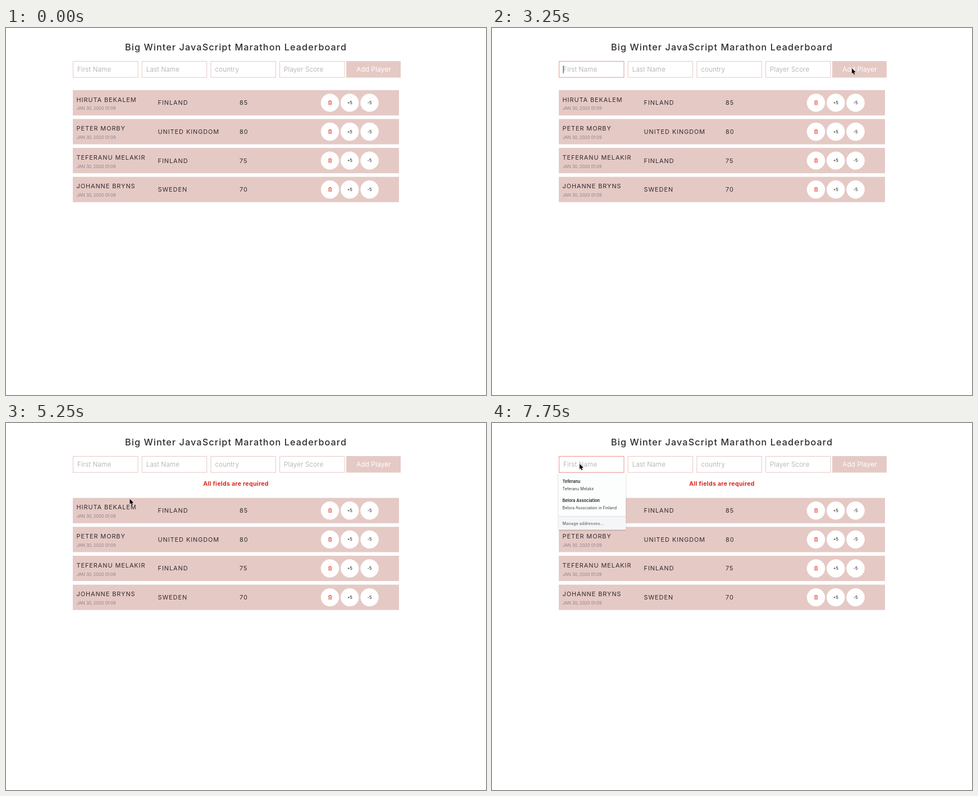
Recreate the animation shown at these times as an HTML page. Size 855 by 655 pixels, loop 8 s.

```html
<!DOCTYPE html>
<html lang="en">
<head>
<meta charset="utf-8">
<title>Leaderboard</title>
<style>
  html, body { margin: 0; width: 100%; height: 100%; overflow: hidden; background: #fff; }
  svg { display: block; width: 855px; height: 655px; font-family: Inter, sans-serif; fill: #302c2e; }
  .title { font-size: 16.2px; font-weight: 500; letter-spacing: 1.1px; text-anchor: middle; }
  .field { fill: #fff; stroke: #e5c9c5; }
  .field.focus { stroke: #ec9488; }
  .hint { font-size: 11.7px; font-weight: 300; letter-spacing: .15px; fill: #a6a6a6; }
  .add { font-size: 11.7px; letter-spacing: .15px; fill: #fff; text-anchor: middle; }
  .error { font-size: 10.6px; font-weight: 700; letter-spacing: .28px; fill: #dc2a1e; text-anchor: middle; }
  .band { fill: #e5c9c5; }
  .cell { font-size: 10.9px; letter-spacing: .95px; }
  .date { font-size: 7.6px; font-weight: 300; letter-spacing: -.05px; fill: #756b76; }
  .disc { fill: #fff; }
  .step { font-size: 7.2px; font-weight: 500; text-anchor: middle; }
  .bin { fill: none; stroke: #e5503f; stroke-width: .9; }
  .menu { font-size: 7.1px; fill: #3c3c3c; }
  .menu .name { font-size: 7.4px; font-weight: 600; fill: #222; }
</style>
</head>
<body>
<svg viewBox="0 0 855 655">
  <defs><filter id="shadow" x="-10%" y="-10%" width="120%" height="120%">
    <feDropShadow dx="0" dy="1" stdDeviation="1" flood-opacity=".35"/>
  </filter></defs>
  <text class="title" x="409.5" y="39.5">Big Winter JavaScript Marathon Leaderboard</text>
  <g id="form"></g>
  <rect class="band" x="606" y="59" width="97" height="29.5"/>
  <text class="add" x="655" y="78.2">Add Player</text>
  <rect id="caret" x="126.5" y="67" width="1" height="14" fill="#333"/>
  <text id="error" class="error" x="409.5" y="112">All fields are required</text>
  <g id="rows"></g>
  <g id="menu" class="menu">
    <rect x="118.5" y="89.5" width="119.7" height="100.7" fill="#fcfefd" filter="url(#shadow)"/>
    <path d="M118.5 167h119.7v23.2H118.5z" fill="#f5f6f7"/>
    <path d="M118.5 166.7h119.7" stroke="#d5d7d8" stroke-width=".8"/>
    <text class="name" x="125.5" y="107.3">Teferanu</text>
    <text x="125.5" y="119.6">Teferanu Melakir</text>
    <text class="name" x="125.5" y="141.4">Belora Association</text>
    <text x="125.5" y="153.7">Belora Association in Finland</text>
    <text x="125.5" y="181.7" font-weight="500" letter-spacing=".15" fill="#666">Manage addresses...</text>
  </g>
  <path id="cursor" d="M0 0v9.6l2.2-2 1.5 3.6 1.7-.7-1.5-3.5h3z" fill="#000" stroke="#fff" paint-order="stroke"/>
</svg>
<script>
const $ = id => document.getElementById(id);
const LOOP = 8000, TICK = 250;

const hints = ['First Name', 'Last Name', 'country', 'Player Score'];
$('form').innerHTML = hints.map((hint, i) => {
  const x = 119.5 + i * 122.7;
  return `<rect class="field" x="${x}" y="59.5" width="115.5" height="28.7"/>
    <text class="hint" x="${x + 7.5}" y="78.2">${hint}</text>`;
}).join('');

const players = [
  ['HIRUTA BEKALEM', 'FINLAND', 85],
  ['PETER MORBY', 'UNITED KINGDOM', 80],
  ['TEFERANU MELAKIR', 'FINLAND', 75],
  ['JOHANNE BRYNS', 'SWEDEN', 70]
];
$('rows').innerHTML = players.map(([name, country, score], i) => `
  <g transform="translate(119 ${110.8 + i * 51.6})">
    <rect class="band" width="581" height="45.2"/>
    <text class="cell" x="6.5" y="20.8">${name}</text>
    <text class="date" x="6.7" y="35.7">JAN 30, 2020 01:09</text>
    <text class="cell" x="151.5" y="26.5">${country}</text>
    <text class="cell" x="297" y="26.5">${score}</text>
    ${[458, 493.3, 528.6].map(x => `<circle class="disc" cx="${x}" cy="22.6" r="16.2"/>`).join('')}
    <path class="bin" d="M455 20.2h6.4M456.9 20v-1.1h2.6V20M455.7 20.4l.2 5.7h4.6l.2-5.7M457.4 21.8v2.9M459 21.8v2.9"/>
    <text class="step" x="493.3" y="25.2">+5</text>
    <text class="step" x="528.6" y="25.2">-5</text>
  </g>`).join('');

// Pointer stops: time, x, y
const stops = [
  [250, 190, 0], [750, 118.5, 186], [1250, 157.5, 38.5], [2000, 199.5, 152], [2500, 291, 110],
  [3250, 641, 72], [4000, 641, 72], [5250, 220.5, 135.5], [6250, 156, 73], [LOOP, 156, 73]
];

function pointerAt(t) {
  const i = stops.findIndex(stop => stop[0] > t);
  const [t0, x0, y0] = stops[i - 1], [t1, x1, y1] = stops[i];
  const k = (t - t0) / (t1 - t0);
  return [x0 + (x1 - x0) * k, y0 + (y1 - y0) * k];
}

const show = (id, on) => $(id).setAttribute('visibility', on ? 'visible' : 'hidden');

function draw(now) {
  const t = Math.floor(now % LOOP / TICK) * TICK;
  const failed = t >= 3500, menuOpen = t >= 6250;
  const clicked = t === 3250;
  const blinkOn = menuOpen && (t - 6250) % 1000 < 500;

  show('error', failed);
  $('rows').setAttribute('transform', `translate(0 ${failed ? 22.9 : 0})`);
  $('form').firstElementChild.classList.toggle('focus', clicked || menuOpen);
  show('caret', clicked || blinkOn);
  show('menu', menuOpen);
  show('cursor', t >= 250);
  if (t >= 250) $('cursor').setAttribute('transform', `translate(${pointerAt(t)})`);
  requestAnimationFrame(draw);
}
requestAnimationFrame(draw);
</script>
</body>
</html>
```
